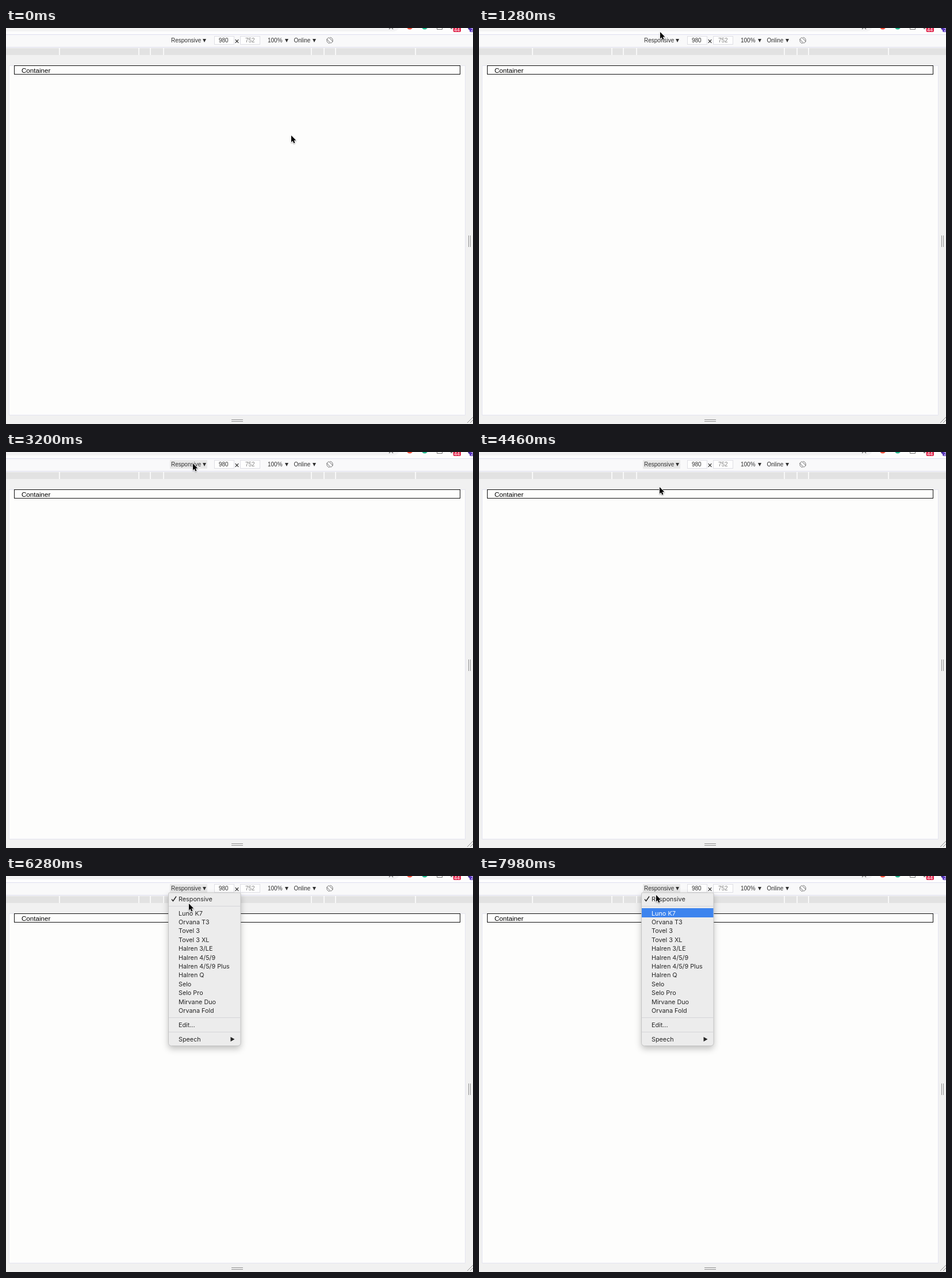
Recreate the animation shown at these times as an HTML page with a canvas. Size 812 px wide and 689 px high, loop 8 s.

```html
<!DOCTYPE html>
<html lang="en">
<head>
<meta charset="utf-8">
<title>Responsive device menu</title>
<style>
  html, body { margin: 0; width: 100%; height: 100%; overflow: hidden; background: #f1f1f1; }
  canvas { display: block; }
</style>
</head>
<body>
<canvas id="stage" width="812" height="689"></canvas>
<script>
const ctx = document.getElementById('stage').getContext('2d');
const LOOP = 8000;
const HOVER_AT = 3080, OPEN_AT = 5640, PICK_AT = 6900;
const HAND = [5020, OPEN_AT];
const UI = '"Liberation Sans", Arial, sans-serif';
const MENU = 'Inter, Roboto, sans-serif';

// Pointer tip: [time, x, y]
const path = [
  [0, 496, 187], [160, 494, 184], [1180, 315, 7], [1340, 315, 7],
  [2100, 317, 11], [3100, 325, 20], [3500, 325, 20], [4420, 314, 61],
  [4500, 314, 61], [5220, 321, 16], [5720, 321, 17], [6220, 318, 48],
  [6340, 318, 48], [6960, 317, 61], [7300, 317, 61], [7900, 308, 33], [8000, 308, 33]
];

const devices = [
  'Luno K7', 'Orvana T3', 'Tovel 3', 'Tovel 3 XL', 'Halren 3/LE', 'Halren 4/5/9',
  'Halren 4/5/9 Plus', 'Halren Q', 'Selo', 'Selo Pro', 'Mirvane Duo', 'Orvana Fold'
];

function rect(x, y, w, h, color) {
  ctx.fillStyle = color;
  ctx.fillRect(x, y, w, h);
}

function frame(x, y, w, h, color) {
  ctx.strokeStyle = color;
  ctx.lineWidth = 1;
  ctx.strokeRect(x + 0.5, y + 0.5, w - 1, h - 1);
}

function text(str, x, y, size, color = '#303030', family = UI) {
  ctx.font = `${size}px ${family}`;
  ctx.fillStyle = color;
  ctx.fillText(str, x, y);
}

function disc(x, y, r, color) {
  ctx.fillStyle = color;
  ctx.beginPath();
  ctx.arc(x, y, r, 0, Math.PI * 2);
  ctx.fill();
}

function line(points, color, width = 1) {
  ctx.strokeStyle = color;
  ctx.lineWidth = width;
  ctx.beginPath();
  points.forEach(([x, y]) => ctx.lineTo(x, y));
  ctx.stroke();
}

function cross(x, y, r, color, width) {
  line([[x - r, y - r], [x + r, y + r]], color, width);
  line([[x + r, y - r], [x - r, y + r]], color, width);
}

function polygon(points, color) {
  ctx.fillStyle = color;
  ctx.beginPath();
  points.forEach(([x, y]) => ctx.lineTo(x, y));
  ctx.closePath();
  ctx.fill();
}

function caret(x) {
  polygon([[x, 19], [x + 6, 19], [x + 3, 25]], '#303030');
}

function round(x, y, w, h, r, color) {
  ctx.fillStyle = color;
  ctx.beginPath();
  ctx.roundRect(x, y, w, h, r);
  ctx.fill();
}

function drawBrowserEdge() {
  rect(0, 0, 812, 11, '#fdfdfd');
  round(-20, -20, 704, 26, 10, '#f3f3f4');
  cross(669.5, -1.5, 3.5, '#666', 1.2);
  disc(702, -3, 5.5, '#f2503b');
  disc(728, -3, 5.5, '#1fb98e');
  line([[749.5, -1], [749.5, 2.5], [758.5, 2.5], [758.5, -1]], '#777');
  rect(773, 0, 3, 2, '#888');
  round(777.5, -5, 13.5, 12, 2, '#e0284f');
  text('44', 779, 6, 9, '#fff');
  disc(808, -1, 5, '#3d2a8c');
  round(806, -4, 12, 11, 2, '#5631bd');
  text('2', 808, 6, 9, '#fff');
  rect(0, 11, 812, 1, '#dedef0');
}

function drawRotateIcon() {
  ctx.save();
  ctx.translate(563, 21.5);
  ctx.strokeStyle = '#666';
  ctx.lineWidth = 0.9;
  ctx.beginPath();
  ctx.arc(0, 0, 5.2, -1.5, 0.5);
  ctx.stroke();
  ctx.beginPath();
  ctx.arc(0, 0, 5.2, 1.6, 3.65);
  ctx.stroke();
  ctx.rotate(-Math.PI / 4);
  ctx.beginPath();
  ctx.roundRect(-2.4, -5, 4.8, 10, 1);
  ctx.stroke();
  ctx.restore();
}

function drawToolbar(hover) {
  rect(0, 12, 812, 21, '#f9f9fa');
  rect(0, 33, 812, 1, '#dcdcee');
  if (hover) rect(285, 14, 65, 15, '#e7e7e7');
  text('Responsive', 287, 25, 10);
  caret(342);
  for (const x of [362, 407]) {
    rect(x, 14, 35, 15, '#fefefe');
    frame(x, 14, 35, 15, '#dedee4');
  }
  text('980', 370, 25, 10);
  text('752', 416, 25, 10, '#818181');
  cross(401.5, 23, 2.8, '#303030', 1.2);
  text('100%', 455, 25, 10);
  caret(485);
  text('Online', 500.5, 25, 10);
  caret(533);
  drawRotateIcon();
}

function drawPage() {
  rect(0, 34, 812, 655, '#f1f1f1');
  rect(0, 34, 812, 1, '#f8f8f8');
  rect(0, 35, 812, 12, '#e2e2e2');
  for (const x of [92, 230, 250, 273, 530, 552, 572, 711]) rect(x, 35, 2, 12, '#f8f8f8');

  rect(5, 65, 794, 609, '#fdfdfc');
  frame(5, 65, 794, 609, '#e5e5f0');
  frame(14, 65, 776, 16, '#111');
  text('Container', 27, 77.5, 11.6, '#000');

  rect(804, 361, 1, 20, '#919191');
  rect(807, 361, 1, 20, '#919191');
  rect(392, 681, 20, 1, '#919191');
  rect(392, 684, 20, 1, '#919191');
  line([[802, 687], [812, 677]], '#919191');
  line([[807, 687], [812, 682]], '#919191');
}

function drawMenu(picked) {
  ctx.save();
  ctx.shadowColor = 'rgba(0,0,0,.25)';
  ctx.shadowBlur = 12;
  ctx.shadowOffsetY = 5;
  round(282.5, 29, 125.5, 266.5, [2, 2, 5, 5], '#ececec');
  ctx.restore();
  ctx.strokeStyle = '#bdbdbd';
  ctx.lineWidth = 0.8;
  ctx.stroke();

  const item = (str, y, color = '#262626') => text(str, 300, y + 4, 10.8, color, MENU);
  line([[288, 40.5], [290.5, 43.5], [296, 35.5]], '#222', 1.4);
  item('Responsive', 40);
  if (picked) rect(283, 56, 124.5, 16, '#3d84ee');
  devices.forEach((name, i) =>
    item(name, 64.7 + i * 15.38, picked && i === 0 ? '#fff' : undefined));
  for (const y of [52, 246, 271]) rect(283, y, 124.5, 1, '#d5d5d8');
  item('Edit...', 259);
  item('Speech', 284);
  polygon([[390.5, 280], [397.5, 284], [390.5, 288]], '#262626');
}

function pointerAt(t) {
  const i = path.findIndex((p, n) => n > 0 && t <= p[0]);
  const [t0, x0, y0] = path[i - 1], [t1, x1, y1] = path[i];
  const u = (t - t0) / (t1 - t0), e = u * u * (3 - 2 * u);
  return [x0 + (x1 - x0) * e, y0 + (y1 - y0) * e];
}

const arrow = new Path2D('M0 0V11.8L2.6 9.3 4.4 13.5 6.4 12.6 4.6 8.6H8.4Z');
const hand = new Path2D(
  'M-1.2 1Q0 -.8 1.3 1V5Q2.7 4 3.7 5.3Q5 4.5 6 5.9Q7.5 5.5 7.8 7V9.5' +
  'Q7.6 11 6.7 12.3V13.5H.2Q-.5 11.5 -2 9.7L-3.7 7.4Q-3 5.8 -1.2 7.5Z');
const knuckles = new Path2D('M1.3 4.5V7M3.7 5.5V7.2M6 6V7.5M1.5 9V11.5M3.3 9V11.5M5 9V11.5');

function drawPointer(t) {
  const isHand = t >= HAND[0] && t < HAND[1];
  const [x, y] = pointerAt(t);
  ctx.save();
  ctx.translate(x, y);
  ctx.lineJoin = 'round';
  ctx.shadowColor = 'rgba(0,0,0,.35)';
  ctx.shadowBlur = 2;
  ctx.shadowOffsetY = 1;
  if (isHand) {
    ctx.fillStyle = '#fff';
    ctx.fill(hand);
    ctx.shadowColor = 'transparent';
    ctx.strokeStyle = '#111';
    ctx.lineWidth = 1;
    ctx.stroke(hand);
    ctx.lineWidth = 0.7;
    ctx.stroke(knuckles);
  } else {
    ctx.strokeStyle = '#fff';
    ctx.lineWidth = 1.6;
    ctx.stroke(arrow);
    ctx.shadowColor = 'transparent';
    ctx.fillStyle = '#000';
    ctx.fill(arrow);
  }
  ctx.restore();
}

function draw(t) {
  drawBrowserEdge();
  drawToolbar(t >= HOVER_AT);
  drawPage();
  if (t >= OPEN_AT) drawMenu(t >= PICK_AT);
  drawPointer(t);
}

const start = performance.now();
function tick() {
  draw((performance.now() - start) % LOOP);
  requestAnimationFrame(tick);
}
tick();
</script>
</body>
</html>
```
